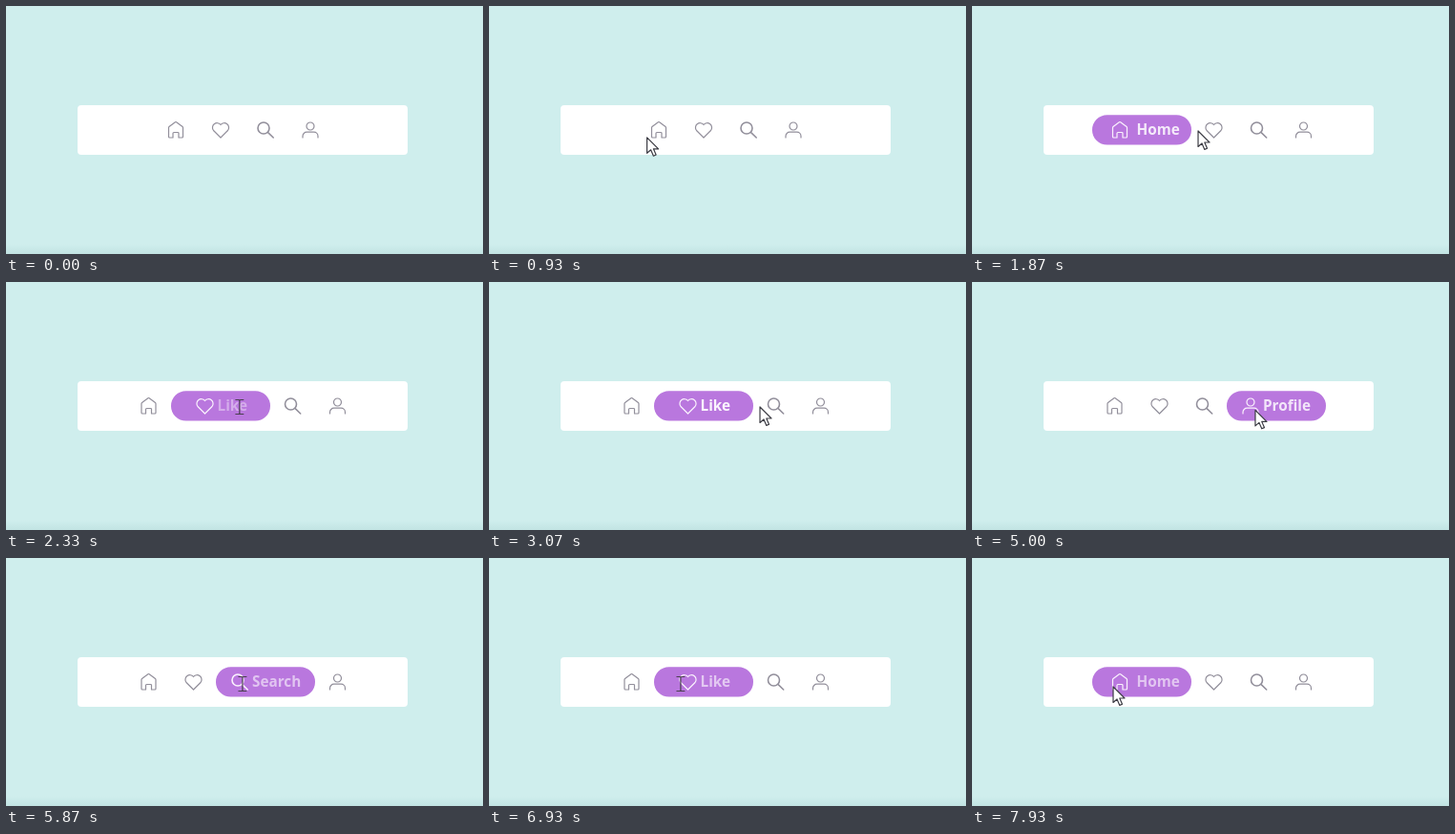
An HTML page with a canvas that plays this animation: 500 px wide and 260 px high, repeating every 8000 ms.

```html
<!DOCTYPE html>
<html lang="en">
<head>
<meta charset="utf-8">
<style>
  html, body { margin: 0; width: 100%; height: 100%; overflow: hidden; background: #cfeeed; }
  canvas { display: block; }
</style>
</head>
<body>
<canvas id="stage" width="500" height="260"></canvas>
<script>
const ctx = document.getElementById('stage').getContext('2d');
const LOOP = 8000, CENTER = 248.5, MIDDLE = 130, NARROW = 47, WIDE = 104;
const PURPLE = [185, 119, 222], GREY = [146, 143, 155], WHITE = [250, 242, 253];

// iconX and textX are offsets inside the expanded pill
const items = [
  { label: 'Home', iconX: 29, textX: 46.5, line: 1.2, icon: new Path2D(
    'M-3 8h-3.5a1 1 0 0 1-1-1v-9.5q0-.6.5-1L-.6-8.3q.6-.4 1.2 0L7-3.5q.5.4.5 1V7a1 1 0 0 1-1 1H3V3.5a1 1 0 0 0-1-1h-4a1 1 0 0 0-1 1Z') },
  { label: 'Like', iconX: 35.5, textX: 48.5, line: 1.2, icon: new Path2D(
    'M0 8L-7.5 .5A4.7 4.7 0 0 1 0-5.5A4.7 4.7 0 0 1 7.5 .5Z') },
  { label: 'Search', iconX: 25, textX: 38, line: 1.6, icon: new Path2D(
    'M4-2a6 6 0 1 1-12 0a6 6 0 1 1 12 0M2.4 2.4L8.2 8') },
  { label: 'Profile', iconX: 25, textX: 38, line: 1.2, icon: new Path2D(
    'M4-4a4 4 0 1 1-8 0a4 4 0 1 1 8 0M-8 8v-1.5a4.3 4.3 0 0 1 4.3-4.3h7.4a4.3 4.3 0 0 1 4.3 4.3v1.5') },
];

// [time, hovered item]
const hovers = [[0, -1], [950, 0], [1900, 1], [3110, 2], [4120, 3], [5250, 2], [6280, 1], [7300, 0]];

// [time, x, y] of the pointer
const pointerPath = [
  [270, 130, 262], [900, 164, 138], [1400, 190, 135], [1870, 237, 131], [2400, 246, 131],
  [3070, 284, 131], [3500, 292, 132], [4070, 337, 134], [4600, 350, 135], [5250, 264, 134],
  [5870, 248, 132], [6280, 217, 132], [6930, 201, 132], [7300, 170, 134], [7930, 148, 135], [8000, 148, 135],
];

const arrow = new Path2D('M0 0V16.5L4 13L6.8 19.4L9.5 18.2L6.8 12H12Z');
const beam = new Path2D('M-4-7.5h3q1 0 1 1q0-1 1-1h3M0-7V7M-4 7.5h3q1 0 1-1q0 1 1 1h3');

const clamp = v => Math.min(1, Math.max(0, v));
const easeOut = v => v * (2 - v);
const lerp = (a, b, p) => a + (b - a) * p;
const rgb = c => `rgb(${c.join()})`;

function pointerAt(t) {
  const next = pointerPath.findIndex(k => k[0] > t);
  if (next < 1) return null;
  const [a, b] = [pointerPath[next - 1], pointerPath[next]];
  const p = (t - a[0]) / (b[0] - a[0]);
  return { x: lerp(a[1], b[1], p), y: lerp(a[2], b[2], p) };
}

function fillRounded(x, y, w, h, r, color) {
  ctx.fillStyle = color;
  ctx.beginPath();
  ctx.roundRect(x, y, w, h, r);
  ctx.fill();
}

function strokeAt(path, x, y, width, color, fill) {
  ctx.save();
  ctx.translate(x, y);
  if (fill) {
    ctx.fillStyle = fill;
    ctx.fill(path);
  }
  ctx.lineWidth = width;
  ctx.lineCap = ctx.lineJoin = 'round';
  ctx.strokeStyle = color;
  ctx.stroke(path);
  ctx.restore();
}

function drawBackdrop() {
  ctx.fillStyle = '#cfeeed';
  ctx.fillRect(0, 0, 500, 260);
  const shade = ctx.createLinearGradient(0, 250, 0, 260);
  shade.addColorStop(0, '#cfeeed');
  shade.addColorStop(1, '#c2e4e3');
  ctx.fillStyle = shade;
  ctx.fillRect(0, 250, 500, 10);
  fillRounded(75, 104, 346, 52, 4, '#fff');
}

function draw(t) {
  drawBackdrop();
  const step = hovers.findLastIndex(h => h[0] <= t);
  const [start, active] = hovers[step];
  const previous = step ? hovers[step - 1][1] : -1;
  const grow = easeOut(clamp((t - start) / 400));
  const open = items.map((_, i) => i === active ? grow : i === previous ? 1 - grow : 0);
  const widths = open.map(p => lerp(NARROW, WIDE, p));
  const pointer = pointerAt(t);
  let x = CENTER - widths.reduce((a, b) => a + b) / 2;
  let overContent = false;

  items.forEach((item, i) => {
    const isActive = i === active;
    const iconX = x + lerp(NARROW / 2, item.iconX, open[i]);
    if (isActive) fillRounded(x, 114.2, widths[i], 31.4, 15.7, rgb(PURPLE));
    const color = isActive ? GREY.map((c, k) => lerp(c, WHITE[k], grow)) : GREY;
    strokeAt(item.icon, iconX, MIDDLE, item.line, rgb(color));
    if (isActive) {
      ctx.font = '700 15.3px "Open Sans", sans-serif';
      ctx.fillStyle = `rgba(255,255,255,${0.92 * clamp((t - start) / 1000)})`;
      const textX = iconX + item.textX - item.iconX;
      ctx.fillText(item.label, textX, 135.2);
      const end = textX + ctx.measureText(item.label).width;
      overContent = pointer && pointer.x > iconX - 9 && pointer.x < end && pointer.y < 133.5;
    }
    x += widths[i];
  });

  if (!pointer) return;
  if (overContent) strokeAt(beam, pointer.x, pointer.y, 1.2, '#4a4050');
  else strokeAt(arrow, pointer.x, pointer.y, 1.2, '#3c3c44', '#fff');
}

const origin = performance.now();
function tick() {
  draw((performance.now() - origin) % LOOP);
  requestAnimationFrame(tick);
}
tick();
</script>
</body>
</html>
```
